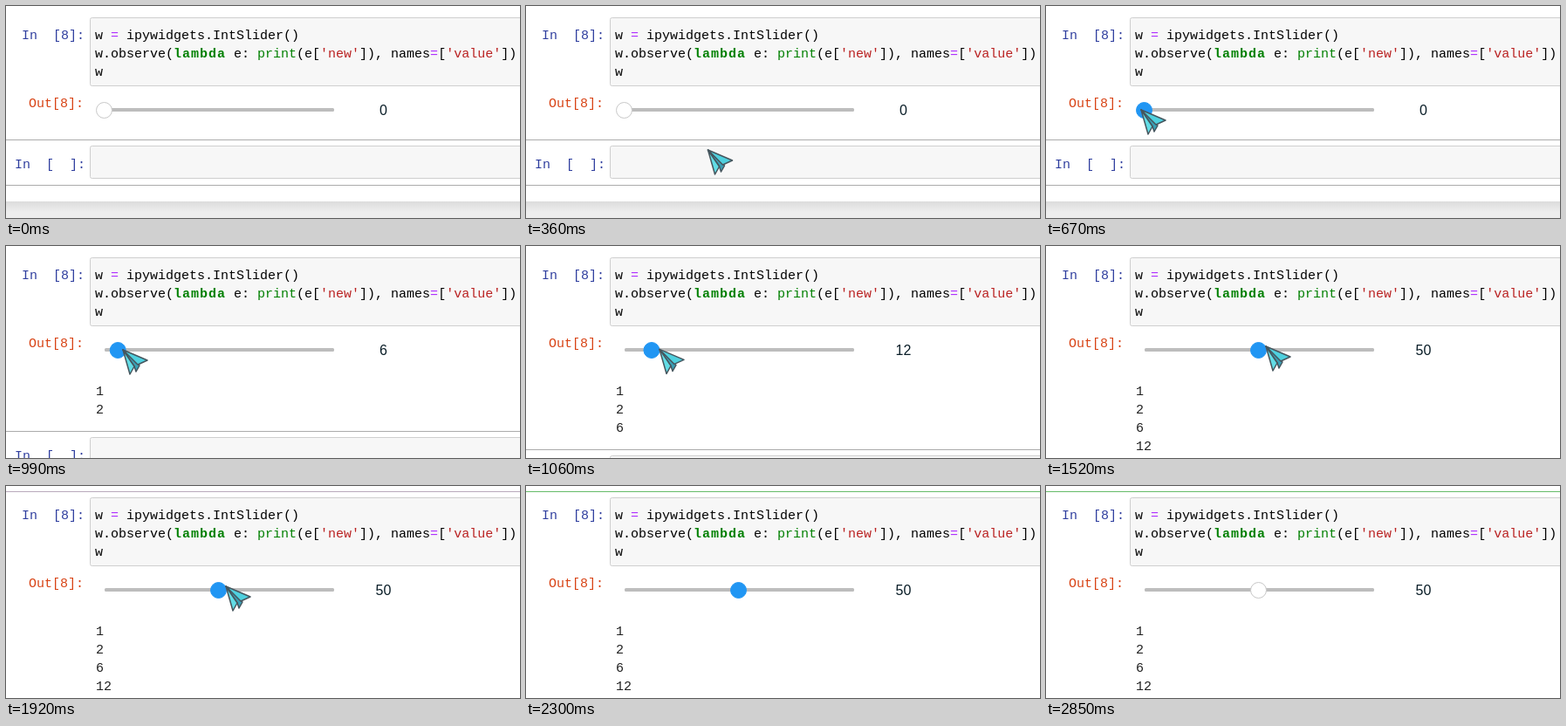
These frames come from a looping animation (589x243 px, 2930 ms). An HTML page:

```html
<!DOCTYPE html>
<html lang="en">
<head>
<meta charset="utf-8">
<title>Slider observer</title>
<style>
  html, body { margin: 0; width: 100%; height: 100%; overflow: hidden; background: #fff; }
  svg { display: block; width: 589px; height: 243px; }
  text { white-space: pre; }
  .mono { font: 15px "Liberation Mono", "DejaVu Sans Mono", monospace; }
  .value { font: 16px "Liberation Sans", Arial, sans-serif; text-anchor: middle; fill: #0a1e28; }
  .box { fill: #f7f7f7; stroke: #cfcfcf; }
  .in { fill: #303f9f; }
  .out { fill: #d84315; }
  .op { fill: #a2f; }
  .key { fill: #008000; font-weight: bold; letter-spacing: 1px; }
  .fn { fill: #008000; }
  .str { fill: #ba2121; }
  .rule { fill: #ababab; }
  .plane { stroke: #46565e; stroke-width: 1.5; stroke-linejoin: round; }
</style>
</head>
<body>
<svg viewBox="0 0 589 243">
  <defs>
    <linearGradient id="shade" x2="0" y2="1">
      <stop stop-color="#dcdcdc"/>
      <stop offset="1" stop-color="#eee"/>
    </linearGradient>
  </defs>
  <rect width="589" height="243" fill="#fff"/>
  <rect id="border" y="6" width="589" height="1"/>

  <rect class="box" x="96.5" y="13.5" width="520" height="78" rx="2"/>
  <g class="mono">
    <text class="in" x="18" y="38">In  [8]:</text>
    <text class="out" x="26" y="116">Out[8]:</text>
    <text x="102" y="38">w <tspan class="op">=</tspan> ipywidgets.IntSlider()</text>
    <text x="102" y="59">w.observe(<tspan class="key">lambda</tspan> e: <tspan class="fn">print</tspan>(e[<tspan class="str">'new'</tspan>]), names<tspan class="op">=</tspan>[<tspan class="str">'value'</tspan>])</text>
    <text x="102" y="80">w</text>
  </g>

  <rect x="113" y="117" width="263" height="4" rx="1.5" fill="#bdbdbd"/>
  <circle id="handle" cy="119.5" r="9"/>
  <text id="value" class="value" x="432.5" y="125"></text>
  <g id="prints" class="mono" fill="#222"></g>

  <g id="next">
    <rect class="rule" y="153" width="589" height="1"/>
    <rect class="box" x="96.5" y="160.5" width="520" height="37" rx="2"/>
    <text class="mono in" x="10" y="186">In  [  ]:</text>
    <rect class="rule" y="205" width="589" height="1"/>
    <rect y="224" width="589" height="80" fill="#eee"/>
    <rect y="224" width="589" height="12" fill="url(#shade)"/>
  </g>

  <g id="cursor" class="plane">
    <path d="M1 1L14 20L16 26L20 19Z" fill="#3a9fb4"/>
    <path d="M1 1L29 13L18 18Z" fill="#4fd0de"/>
    <path d="M1 1L14 20L9 29Z" fill="#62dde6"/>
  </g>
</svg>
<script>
const LOOP = 2930;
const STEP = 76.5;
const PRINTED = [1, 2, 6, 12];
const DRAG_VALUES = [6, 12, 20, 29, 37, 44, 49, 50];
const DRAG_X = [133, 152, 173, 194, 213, 232, 248, 251];
const $ = id => document.getElementById(id);

const lines = PRINTED.map((n, i) => {
  const line = document.createElementNS("http://www.w3.org/2000/svg", "text");
  line.setAttribute("x", 103);
  line.setAttribute("y", 170.5 + 21 * i);
  line.textContent = n;
  return $("prints").appendChild(line);
});

const clamp = (v, lo, hi) => Math.min(hi, Math.max(lo, v));
const ease = p => p * p * (3 - 2 * p);
const mix = (a, b, p) => a + (b - a) * p;
const stepsSince = (t, start, last) => clamp(Math.floor((t - start + 7) / STEP), 0, last);
const show = (node, on) => node.setAttribute("visibility", on ? "visible" : "hidden");

function cursorAt(t) {
  if (t < 130 || t >= 2300) return null;
  if (t < 990) {
    const k = stepsSince(t, 130, 9);
    const p = ease(Math.min(k / 6, 1));
    return [mix(309, 106, p) + 2 * Math.max(0, k - 6), mix(210, 118, p)];
  }
  if (t < 1920) {
    const k = stepsSince(t, 990, 7);
    return [DRAG_X[k], mix(118, 114, k / 7)];
  }
  const p = ease(stepsSince(t, 1920, 4) / 4);
  return [mix(251, 350, p), mix(114, 151, p)];
}

function render(t) {
  const dragged = t >= 990;
  const k = stepsSince(t, 990, 7);
  const value = dragged ? DRAG_VALUES[k] : 0;
  const printed = dragged ? Math.min(k + 2, 4) : 0;
  const cursor = cursorAt(t);

  const active = t >= 510 && t < 2850;
  const handle = $("handle");
  handle.setAttribute("cx", 112.5 + 2.62 * value);
  handle.setAttribute("fill", active ? "#2196f3" : "#fff");
  handle.setAttribute("stroke", active ? "#2196f3" : "#c8c8c8");
  $("value").textContent = value;

  lines.forEach((line, i) => show(line, i < printed));
  const shift = dragged ? 17 + 21 * (k + 2) : 0;
  $("next").setAttribute("transform", `translate(0 ${shift})`);

  // The cell is selected first, then enters edit mode.
  show($("border"), t >= 1920);
  $("border").setAttribute("fill", t < 2000 ? "#b9a9bb" : "#66bb6a");

  show($("cursor"), cursor);
  if (cursor) $("cursor").setAttribute("transform", `translate(${cursor})`);
}

const start = performance.now();
function tick() {
  render((performance.now() - start) % LOOP);
  requestAnimationFrame(tick);
}
tick();
</script>
</body>
</html>
```
